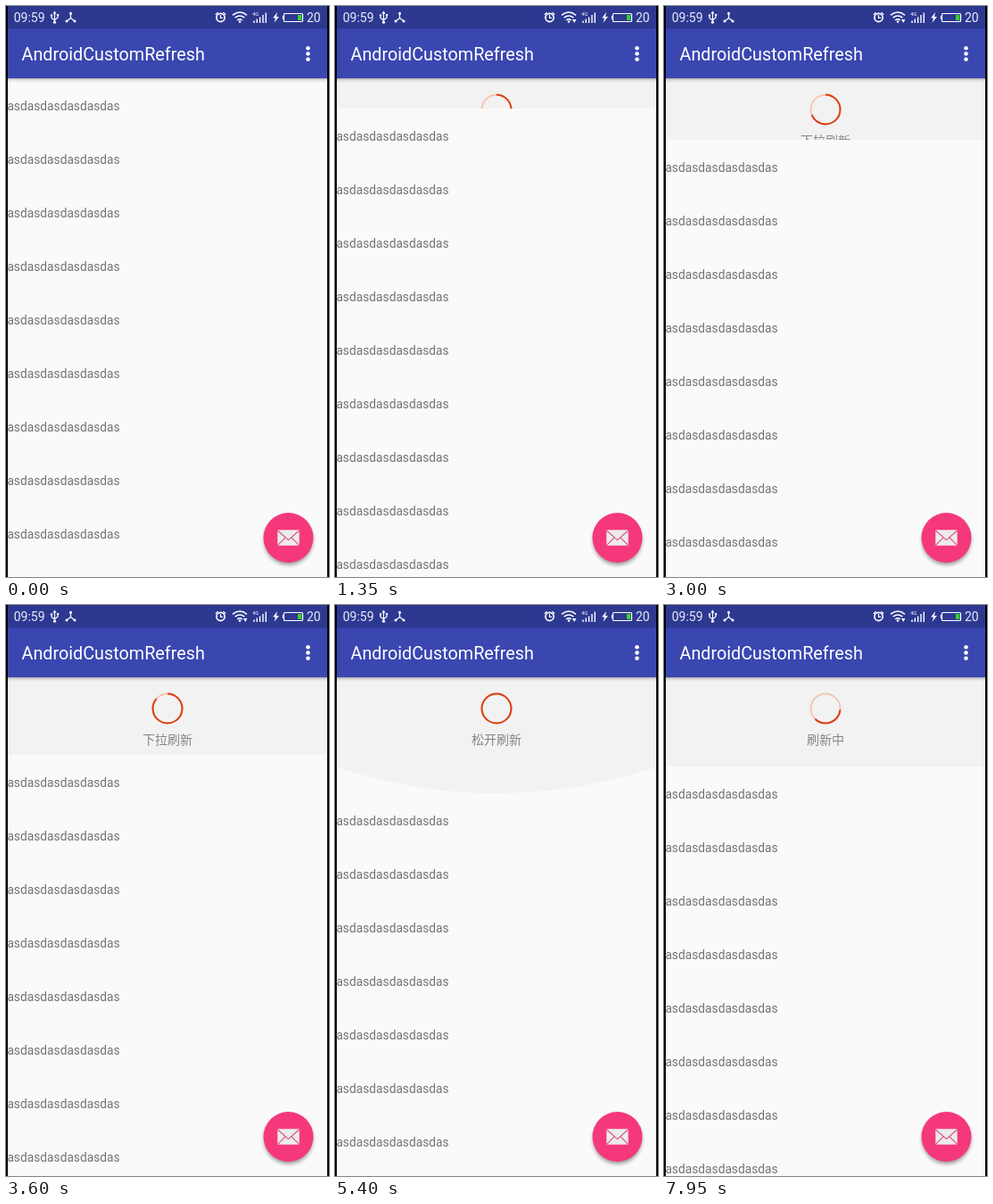
Recreate the animation shown at these times as an HTML page. Size 362 by 640 pixels, loop 8000 ms.

```html
<!DOCTYPE html>
<html lang="zh">
<head>
<meta charset="utf-8">
<title>Pull to refresh</title>
<style>
  html, body { margin: 0; width: 100%; height: 100%; overflow: hidden; background: #000; }
  svg { display: block; width: 100vw; height: 100vh; }
  text { font-family: Roboto, "Noto Sans", sans-serif; }
  .rows { font-size: 13.75px; fill: #737373; }
  .label { font: 14px "Noto Sans CJK SC", "Noto Sans CJK", sans-serif; fill: #858585; text-anchor: middle; }
  .clock { font-size: 14px; fill: #e8eaf5; }
  .title { font-size: 19.8px; fill: #fff; }
  .line { fill: none; stroke: #fff; }
</style>
</head>
<body>
<svg viewBox="0 0 362 640">
  <defs>
    <linearGradient id="drop" x2="0" y2="1">
      <stop offset="0" stop-color="#000" stop-opacity=".3"/>
      <stop offset=".4" stop-color="#000" stop-opacity=".1"/>
      <stop offset="1" stop-color="#000" stop-opacity="0"/>
    </linearGradient>
    <filter id="soft" x="-30%" y="-30%" width="160%" height="160%"><feGaussianBlur stdDeviation="2.2"/></filter>
    <clipPath id="screen"><path d="M2 0H360V640H2z"/></clipPath>
  </defs>
  <rect width="362" height="640"/>
  <g clip-path="url(#screen)">
    <!-- refresh header -->
    <rect y="81" width="362" height="559" fill="#f2f2f2"/>
    <g fill="none" stroke-width="2">
      <circle cx="181" cy="116" r="16.5" stroke="#f3c7b4"/>
      <circle id="arc" cx="181" cy="116" r="16.5" stroke="#df3d10" pathLength="360"/>
    </g>
    <text id="label" class="label" x="181" y="156"></text>

    <!-- list -->
    <path id="sheet" fill="#fafafa"/>
    <g id="rows" class="rows"></g>

    <!-- bars -->
    <rect y="81" width="362" height="5" fill="url(#drop)"/>
    <rect y="25" width="362" height="56" fill="#3a47b0"/>
    <rect width="362" height="25.5" fill="#2d3991"/>
    <text class="title" x="17.5" y="61">AndroidCustomRefresh</text>
    <g fill="#fff">
      <circle cx="338.5" cy="47.3" r="2.3"/>
      <circle cx="338.5" cy="53.5" r="2.3"/>
      <circle cx="338.5" cy="59.7" r="2.3"/>
    </g>

    <!-- status icons -->
    <text class="clock" x="8.7" y="18">09:59</text>
    <g class="line" stroke-width="1.2">
      <path d="M54.5 8V18M51 11V13.5L54.5 16L58 13V10"/>
      <path d="M72.5 8V13.5L68 17M72.5 13.5L77 17"/>
      <circle cx="240.5" cy="13" r="4.6" stroke-width="1.7"/>
      <path d="M240.5 10V13.3H243M234.8 9.8L237.6 7.2M246.2 9.8L243.4 7.2"/>
      <path d="M254 10.3Q262 3.7 270 10.3M256.7 13.2Q262 8.8 267.3 13.2M259.2 16Q262 13.6 264.8 16" stroke-width="1.5"/>
      <path d="M278 16.5V19M281.3 14.5V19M284.6 12.5V19M288 10V19M291.3 7.5V19" stroke-width="1.4"/>
      <rect x="311.5" y="8.5" width="21" height="9" rx="1"/>
      <path d="M310.5 11V15"/>
    </g>
    <g fill="#fff">
      <path d="M54.5 5.5L56.5 8.8H52.5z"/>
      <circle cx="54.5" cy="18.2" r="1.6"/>
      <circle cx="51" cy="10.5" r="1.2"/>
      <path d="M57 9H59.2V11.2H57z"/>
      <circle cx="72.5" cy="8.3" r="1.5"/>
      <circle cx="68" cy="17" r="1.5"/>
      <circle cx="77" cy="17" r="1.5"/>
      <circle cx="262" cy="17.6" r="1.3"/>
      <path id="traffic" d="M266 15H270.4L268.2 19z"/>
      <text x="276" y="11" font-size="6">4G</text>
      <path d="M304 7L299.2 13.6H302L300.6 18.8L306 12H303z"/>
    </g>
    <rect x="327" y="10" width="4.3" height="6" fill="#35d22c"/>
    <text class="clock" x="337" y="18">20</text>

    <!-- mail button -->
    <circle cx="316.5" cy="599" r="27.5" opacity=".38" filter="url(#soft)"/>
    <circle cx="316.5" cy="596" r="28" fill="#f5387b"/>
    <rect x="304.3" y="587.3" width="24.4" height="17.4" rx="1" fill="#ececec"/>
    <path d="M304.5 588L316.5 598.6L328.5 588M304.5 604.4L313 595.8M328.5 604.4L320 595.8" fill="none" stroke="#e0487f" stroke-width="1.1"/>
  </g>
</svg>
<script>
  const $ = id => document.getElementById(id);
  const LOOP = 8000, STEP = 150, HEADER = 100, RELEASE = 6450;
  // time in ms, pull distance in px
  const pull = [[300, 0], [1350, 34], [1950, 46.5], [3000, 69], [4200, 104], [5400, 130], [6300, 130]];

  $('rows').innerHTML = Array.from({ length: 10 }, (_, i) =>
    `<text x="1.4" y="${117 + i * 60}">asdasdasdasdasdas</text>`).join('');

  function distance(t) {
    if (t >= RELEASE) return HEADER + 30 * Math.max(0, 1 - (t - 6300) / 450) ** 2;
    const i = pull.findIndex(p => t <= p[0]);
    if (i < 1) return i ? 130 : 0;
    const [t0, d0] = pull[i - 1], [t1, d1] = pull[i];
    return d0 + (d1 - d0) * (t - t0) / (t1 - t0);
  }

  function draw(t) {
    const d = distance(t), loading = t >= RELEASE;
    const edge = 81 + Math.min(d, HEADER);
    const bulge = edge + 2 * Math.max(0, d - HEADER);
    $('sheet').setAttribute('d', `M0 ${edge}Q181 ${bulge} 362 ${edge}V640H0z`);
    $('rows').setAttribute('transform', `translate(0 ${d})`);

    const start = loading ? 95 + (t - 7950) * .36 : 0;
    const sweep = loading ? 130 : Math.min(d / HEADER, 1) * 360;
    $('arc').setAttribute('stroke-dasharray', `${sweep} 360`);
    $('arc').setAttribute('transform', `rotate(${start - 90} 181 116)`);
    $('label').textContent = loading ? '刷新中' : d < HEADER ? '下拉刷新' : '松开刷新';
    $('traffic').style.display = t < 900 ? 'none' : '';
  }

  function tick() {
    const t = performance.now() % LOOP;
    draw(Math.floor(t / STEP) * STEP);
    requestAnimationFrame(tick);
  }
  tick();
</script>
</body>
</html>
```
